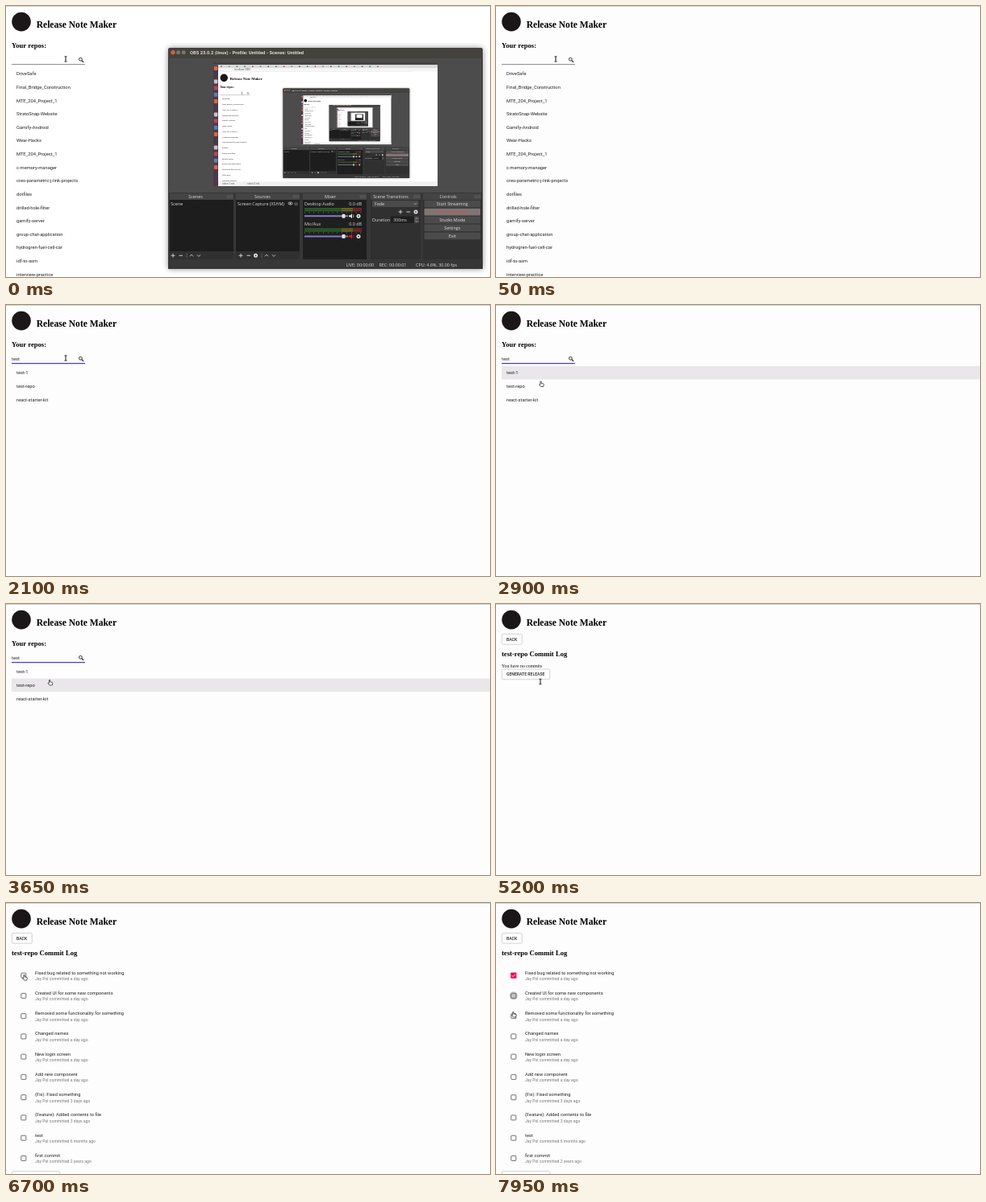
Write an HTML page with a canvas that moves like this. It is 600 px wide and 337 px high and loops after 8 s.

```html
<!DOCTYPE html>
<html lang="en">
<head>
<meta charset="utf-8">
<title>Release Note Maker</title>
<style>
html, body { margin: 0; width: 100%; height: 100%; overflow: hidden; background: #fff; }
canvas { display: block; width: 600px; height: 337px; }
</style>
</head>
<body>
<canvas id="stage"></canvas>
<script>
const canvas = document.getElementById('stage');
const ctx = canvas.getContext('2d');
const dpr = window.devicePixelRatio || 1;
canvas.width = 600 * dpr;
canvas.height = 337 * dpr;

const LOOP = 8000, STEP = 50;
const INK = '#212121', PURPLE = '#5540c4', PINK = '#f50057';
const ROBOTO = 'Roboto, sans-serif';
const SERIF = '"Liberation Serif", serif';
const UI = '5.4px "Open Sans", sans-serif';
const BODY = '5.76px ' + ROBOTO;

const repos = ['DriveSafe', 'Final_Bridge_Construction', 'MTE_204_Project_1', 'StratoSnap-Website',
  'Gamify-Android', 'Wear-Hacks', 'MTE_204_Project_1', 'c-memory-manager',
  'creo-parametric-j-link-projects', 'dotfiles', 'drilled-hole-filter', 'gamify-server',
  'group-chat-application', 'hydrogren-fuel-cell-car', 'idf-to-asm', 'interview-practice'];
const matches = ['test-1', 'test-repo', 'react-starter-kit'];
const commits = [
  ['Fixed bug related to something not working', 'a day'],
  ['Created UI for some new components', 'a day'],
  ['Removed some functionality for something', 'a day'],
  ['Changed names', 'a day'], ['New login screen', 'a day'], ['Add new component', 'a day'],
  ['(Fix): Fixed something', '3 days'], ['(Feature): Added contents to file', '3 days'],
  ['test', '6 months'], ['first commit', '2 years']];

// time, x, y of the pointer
const path = [[0, 74, 66], [2500, 74, 66], [2800, 56.5, 98.5], [2950, 56.5, 98.5], [3150, 55, 98],
  [5100, 55, 98], [5150, 55, 96.5], [5750, 55, 96.5], [6300, 23.5, 93], [7100, 23.5, 93],
  [7450, 22.5, 117], [7600, 22.5, 117], [7950, 22.3, 139]];

const clamp = v => Math.max(0, Math.min(1, v));
const ease = v => v * v * (3 - 2 * v);

function rect(x, y, w, h, color) {
  ctx.fillStyle = color;
  ctx.fillRect(x, y, w, h);
}
function dot(x, y, r, color) {
  ctx.fillStyle = color;
  ctx.beginPath();
  ctx.arc(x, y, r, 0, 7);
  ctx.fill();
}
function line(points, color, width) {
  ctx.strokeStyle = color;
  ctx.lineWidth = width;
  ctx.beginPath();
  points.forEach(p => ctx.lineTo(p[0], p[1]));
  ctx.stroke();
}
function box(x, y, w, h, r, stroke, width, fill) {
  ctx.beginPath();
  ctx.roundRect(x, y, w, h, r);
  if (fill) { ctx.fillStyle = fill; ctx.fill(); }
  if (stroke) { ctx.strokeStyle = stroke; ctx.lineWidth = width; ctx.stroke(); }
}
function text(s, x, y, font, color, align = 'left') {
  ctx.font = font;
  ctx.fillStyle = color;
  ctx.textAlign = align;
  ctx.fillText(s, x, y);
}

function header(bg) {
  rect(0, 0, 600, 337, bg);
  rect(0, 0, 600, 1, '#d2d2d2');
  dot(19, 19.6, 11.8, '#1b1718');
  text('Release Note Maker', 37.7, 26.6, 'bold 11.55px ' + SERIF, '#000');
}

function button(label, y, w) {
  box(7.3, y, w, 12.8, 1.6, '#c2c2c2', 0.7);
  text(label, 13, y + 8.3, '500 5.1px ' + ROBOTO, INK);
}

function repoPage(t) {
  const typed = [1400, 1500, 1600, 1750].filter(k => t >= k).length;
  const items = typed > 2 ? matches : repos;
  const focus = ease(clamp((t - 200) / 250));
  text('Your repos:', 7, 51.8, 'bold 8.6px ' + SERIF, '#000');
  rect(7, 72.4, 91, 0.7, '#555');
  if (focus) rect(52.5 - 45.5 * focus, 72, 91 * focus, 1.2, PURPLE);
  if (focus && !typed && (t - 200) % 1000 < 500 || t >= 1200 && t < 1400) rect(7.1, 63.2, 0.8, 7.8, PURPLE);
  text('test'.slice(0, typed), 7, 69.3, BODY, INK);
  ctx.strokeStyle = '#222';
  ctx.lineWidth = 0.9;
  ctx.beginPath();
  ctx.arc(92.4, 66.3, 1.9, 0, 7);
  ctx.stroke();
  line([[93.8, 67.7], [96.1, 70]], '#222', 1.1);

  const hover = t < 2850 ? -1 : t < 3000 ? 0 : 1;
  if (hover >= 0) rect(7, 76 + 16.6 * hover, 593, 16.6, '#e9e7e9');
  items.forEach((name, i) => text(name, 13, 86.3 + i * 16.63, BODY, INK));
}

function checkbox(x, y, checked) {
  if (checked) {
    box(x - 3.6, y - 3.6, 7.2, 7.2, 0.8, null, 0, PINK);
    line([[x - 2.2, y], [x - 0.7, y + 1.6], [x + 2.4, y - 1.6]], '#fff', 0.9);
  } else {
    box(x - 3, y - 3, 6, 6, 0.6, '#6a6a6a', 0.95);
  }
}

function commitPage(t) {
  button('BACK', 37.4, 25);
  text('test-repo Commit Log', 7, 65.2, 'bold 8.64px ' + SERIF, '#000');
  if (t < 5350) {
    text('You have no commits', 7, 79.4, '5.76px ' + SERIF, '#111');
    button('GENERATE RELEASE', 81, 59.4);
    return;
  }
  commits.forEach(([title, age], i) => {
    const y = 90.1 + i * 25.26;
    const pressed = i === 0 ? t >= 6750 && t < 7100 : i === 1 && t >= 7600;
    if (pressed) dot(21.8, y, 5, 'rgba(0,0,0,.22)');
    checkbox(21.8, y, i === 0 && t >= 7050);
    text(title, 36, y - 1.5, BODY, INK);
    text('Jay Pol committed ' + age + ' ago', 36, y + 6, '5.1px ' + ROBOTO, '#777');
  });
  button('GENERATE RELEASE', 333.6, 59.4);
}

function beam(x, y) {
  line([[x - 1.5, y - 3.2], [x + 1.5, y - 3.2]], '#222', 0.9);
  line([[x - 1.5, y + 3.2], [x + 1.5, y + 3.2]], '#222', 0.9);
  line([[x, y - 3], [x, y + 3]], '#222', 1.1);
}

function hand(x, y) {
  ctx.beginPath();
  [[-1.5, -3.5], [-0.4, -3.5], [-0.3, -1.1], [2.4, -0.6], [2.8, 0.2], [2.3, 3], [-1, 3],
    [-3, 0.6], [-2.5, 0], [-1.6, 0.6]].forEach(p => ctx.lineTo(x + p[0], y + p[1]));
  ctx.closePath();
  ctx.fillStyle = '#fff';
  ctx.fill();
  ctx.strokeStyle = '#333';
  ctx.lineWidth = 0.8;
  ctx.lineJoin = 'round';
  ctx.stroke();
}

function pointer(t) {
  let i = 0;
  while (i < path.length - 2 && t >= path[i + 1][0]) i++;
  const [t0, x0, y0] = path[i], [t1, x1, y1] = path[i + 1];
  const k = ease(clamp((t - t0) / (t1 - t0)));
  const isBeam = t < 2600 || t >= 5150 && t < 5900;
  (isBeam ? beam : hand)(x0 + (x1 - x0) * k, y0 + (y1 - y0) * k);
}

function gear(x, y) {
  dot(x, y, 2.5, '#e6e6e6');
  dot(x, y, 0.9, '#333');
}

function tools(x, withGear) {
  const c = '#d8d8d8', y = 310.3, s = withGear ? 9 : 0;
  line([[x - 2.5, y], [x + 2.5, y]], c, 0.9);
  line([[x, y - 2.5], [x, y + 2.5]], c, 0.9);
  line([[x + 7.5, y], [x + 12, y]], c, 0.9);
  if (withGear) gear(x + 18.5, y);
  line([[x + 17 + s, y - 3], [x + 17 + s, y + 3]], '#777', 0.6);
  line([[x + 21 + s, y + 1], [x + 23 + s, y - 1.2], [x + 25 + s, y + 1]], c, 0.8);
  line([[x + 30 + s, y - 1], [x + 32 + s, y + 1.2], [x + 34 + s, y - 1]], c, 0.8);
}

function mixer(label, y, speaker) {
  text(label, 370, y + 2, UI, '#ddd');
  text('0.0 dB', 441, y + 2, UI, '#ddd', 'right');
  [5.3, 7.6].forEach(dy => {
    rect(370, y + dy, 46, 1.6, '#2c6b26');
    rect(416, y + dy, 14, 1.6, '#7c7424');
    rect(430, y + dy, 11, 1.6, '#8a2626');
  });
  for (let i = 0; i < 13; i++) rect(370 + i * 5.8, y + 10, 0.5, 1.5, '#999');
  rect(370, y + 14.2, 54, 2, '#8579c9');
  box(416.5, y + 12.7, 4, 5, 1, null, 0, '#e4e4e4');
  ctx.fillStyle = speaker;
  ctx.beginPath();
  [[425, -1], [427, -1], [429, -3], [429, 3], [427, 1], [425, 1]].forEach(p => ctx.lineTo(p[0], y + 15.2 + p[1]));
  ctx.fill();
  line([[430.3, y + 13.5], [431, y + 15.2], [430.3, y + 17]], speaker, 0.7);
  gear(437, y + 15.2);
}

function preview(depth) {
  ctx.save();
  ctx.beginPath();
  ctx.rect(257, 70, 278, 154);
  ctx.clip();
  rect(257, 70, 278, 154, '#fff');
  if (depth < 4) {
    ctx.save();
    ctx.translate(262.6, 81.4);
    ctx.scale(0.402, 0.4055);
    desktop(depth + 1);
    ctx.restore();
  }
  rect(257, 70, 278, 3.2, '#45433e');
  rect(257, 73.2, 278, 4.2, '#d9dadd');
  rect(257, 77.4, 278, 4, '#f5f5f6');
  for (let i = 0; i < 21; i++) dot(267 + i * 9.7, 75.2, 0.9, ['#c45', '#579', '#666', '#5a6'][i * 7 % 4]);
  text('localhost:3000', 283, 80.4, '3px ' + ROBOTO, '#555');
  rect(257, 218.3, 278, 6, '#f0f0f1');
  text('notes-1.md', 268, 222.3, '3px ' + ROBOTO, '#666');
  text('notes-2.md', 299, 222.3, '3px ' + ROBOTO, '#666');
  rect(257, 73.2, 6, 151, '#50374c');
  for (let i = 0; i < 16; i++) {
    box(257.8, 75 + i * 8.2, 4.6, 5, 0.8, null, 0, ['#d8693f', '#c8c4c0', '#5b82a8', '#3f3f46', '#b44a5c'][i * 3 % 5]);
  }
  ctx.restore();
}

function recorder(depth) {
  ctx.save();
  ctx.shadowColor = 'rgba(0,0,0,.45)';
  ctx.shadowBlur = 7 * dpr * 0.4 ** depth;
  box(201, 52, 390, 275, [3, 3, 0, 0], null, 0, '#373737');
  ctx.restore();
  box(201, 52, 390, 13, [3, 3, 0, 0], null, 0, '#43423d');
  dot(207, 57.7, 2.7, '#dd5a45');
  dot(213.6, 57.7, 2.5, '#77756d');
  dot(220.2, 57.7, 2.5, '#77756d');
  text('OBS 23.0.2 (linux) - Profile: Untitled - Scenes: Untitled', 228, 60, 'bold 5.8px ' + ROBOTO, '#dcd9d0');
  rect(202, 65, 388, 167, '#4c4c4c');
  preview(depth);

  [['Scenes', 203, 79, 235], ['Sources', 285, 79, 318], ['Mixer', 368, 79, 402],
    ['Scene Transitions', 452, 62, 477], ['Controls', 517, 72, 548]].forEach(([label, x, w, cx]) => {
    rect(x, 233, w, 8, '#444');
    rect(x, 241, w, 74, '#303030');
    text(label, cx, 239.2, UI, '#ddd', 'center');
    box(x + w - 8, 235.7, 2.6, 2.6, 0.3, '#777', 0.5);
    box(x + w - 4, 235.7, 2.6, 2.6, 0.3, '#777', 0.5);
  });
  [203, 285].forEach(x => rect(x, 241, 79, 64, '#1d1d1d'));
  rect(368, 241, 79, 74, '#1f1f1f');
  text('Scene', 204.3, 247.6, UI, '#ddd');
  text('Screen Capture (XSHM)', 287, 247.6, UI, '#ddd');
  ctx.strokeStyle = '#ddd';
  ctx.lineWidth = 0.7;
  ctx.beginPath();
  ctx.ellipse(352.5, 245.5, 2.7, 1.6, 0, 0, 7);
  ctx.stroke();
  dot(352.5, 245.5, 0.9, '#ddd');
  box(358, 245, 3, 2.4, 0.3, '#aaa', 0.6);
  tools(207, false);
  tools(291, true);
  mixer('Desktop Audio', 246, '#e6e6e6');
  mixer('Mic/Aux', 271.3, '#d22');

  box(454, 242, 57.5, 8, 1, null, 0, '#4a4a4a');
  text('Fade', 457, 248, UI, '#ddd');
  line([[506, 245.2], [507.5, 246.8], [509, 245.2]], '#ccc', 0.7);
  line([[486.5, 256], [491.5, 256]], '#ddd', 0.9);
  line([[489, 253.5], [489, 258.5]], '#ddd', 0.9);
  line([[496.5, 256], [501, 256]], '#ddd', 0.9);
  gear(508, 256);
  text('Duration', 454, 267.8, UI, '#ddd');
  box(477, 261.5, 35, 8.6, 1, null, 0, '#1f1f1f');
  text('300ms', 480, 267.8, UI, '#ddd');
  rect(506, 261.5, 6, 8.6, '#4a4a4a');
  line([[507.5, 265], [509, 263.5], [510.5, 265]], '#ccc', 0.6);
  line([[507.5, 267], [509, 268.5], [510.5, 267]], '#ccc', 0.6);

  ['Start Streaming', 'Stop Recording', 'Studio Mode', 'Settings', 'Exit'].forEach((label, i) => {
    const hot = i === 1;
    box(518.5, 241.8 + i * 9.9, 69.5, 8.8, 1, null, 0, hot ? '#7f7674' : '#4b4b4b');
    text(label, 553.3, 248 + i * 9.9, UI, hot ? '#c8504c' : '#e0e0e0', 'center');
  });

  text('LIVE: 00:00:00', 421.5, 323.8, UI, '#ddd');
  text('REC: 00:00:01', 462.5, 323.8, UI, '#ddd');
  text('CPU: 4.6%, 30.00 fps', 508, 323.8, UI, '#ddd');
}

function desktop(depth) {
  header('#fff');
  repoPage(0);
  pointer(0);
  recorder(depth);
}

function draw(t) {
  ctx.setTransform(dpr, 0, 0, dpr, 0, 0);
  if (t < 50) return desktop(0);
  header('#fdfdfe');
  (t < 4000 ? repoPage : commitPage)(t);
  pointer(t);
}

function tick() {
  draw(Math.floor(performance.now() % LOOP / STEP) * STEP);
  requestAnimationFrame(tick);
}
tick();
</script>
</body>
</html>
```
